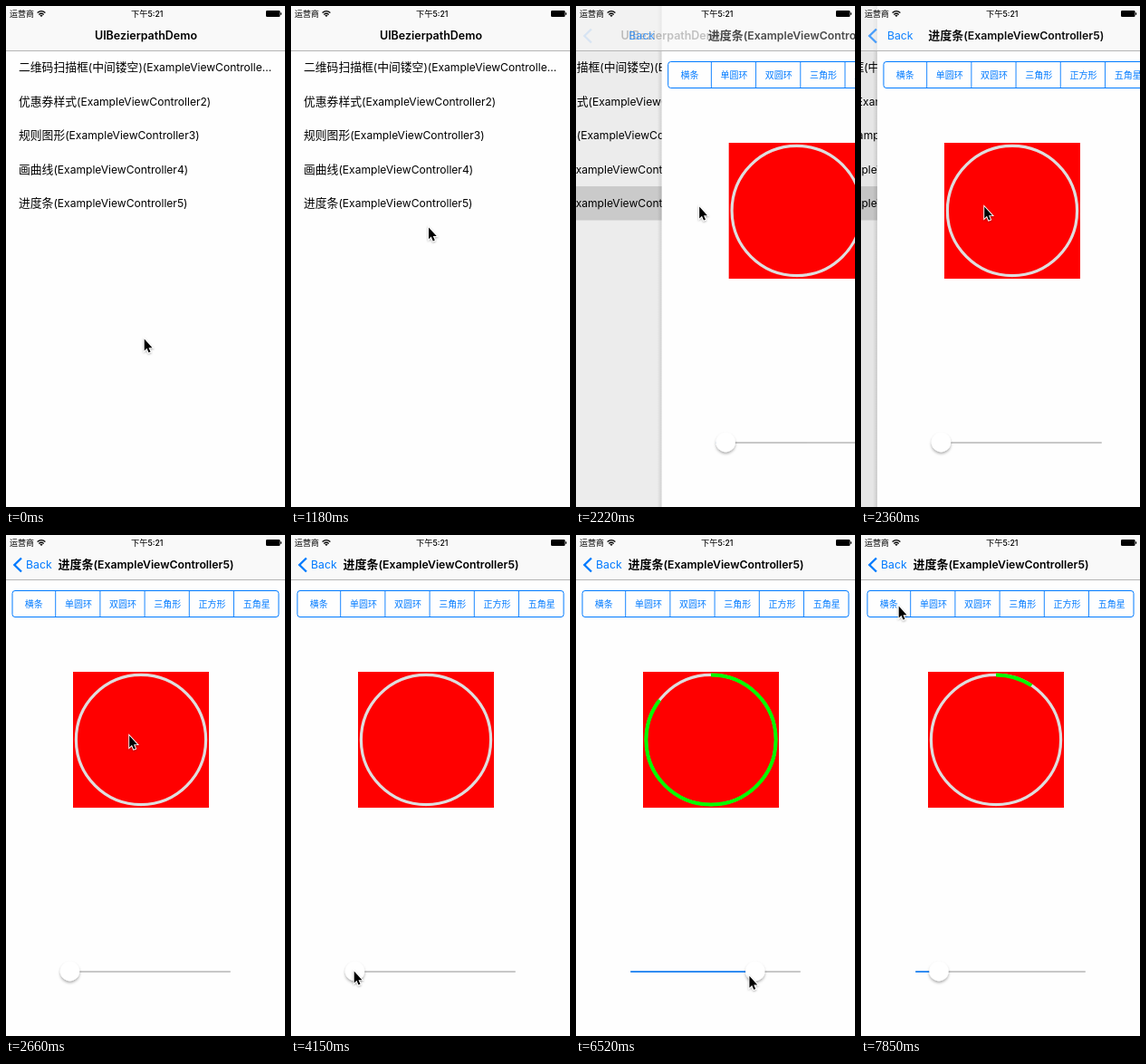
Recreate the animation shown at these times as an HTML page. Size 308x553 px, loop 8000 ms.

```html
<!DOCTYPE html>
<html lang="zh">
<head>
<meta charset="utf-8">
<style>
  html, body { margin: 0; width: 100%; height: 100%; overflow: hidden; background: #fefefe; }
  svg { display: block; width: 308px; height: 553px; font-family: Inter, "Noto Sans CJK SC", "Noto Sans CJK", sans-serif; }
  .blue { fill: #007aff; }
  .line { fill: none; stroke: #007aff; }
  .title { font-weight: 600; text-anchor: middle; }
</style>
</head>
<body>
<svg viewBox="0 0 308 553">
  <defs>
    <linearGradient id="edge"><stop stop-opacity="0"/><stop offset="1" stop-opacity=".12"/></linearGradient>
    <filter id="soft" x="-50%" y="-50%" width="200%" height="200%">
      <feDropShadow dx="0" dy="2" stdDeviation="1.4" flood-opacity=".32"/>
    </filter>
    <filter id="faint" x="-50%" y="-50%" width="200%" height="200%">
      <feDropShadow dx="0" dy="1" stdDeviation=".8" flood-opacity=".35"/>
    </filter>
  </defs>
  <rect width="308" height="553" fill="#fefefe"/>

  <g id="list">
    <rect id="selected" y="199" width="400" height="37.5" fill="#d9d9d9"/>
    <g id="rows"></g>
  </g>
  <rect id="dim" width="308" height="553"/>

  <g id="page">
    <rect x="-5" width="5" height="553" fill="url(#edge)"/>
    <rect width="308" height="553" fill="#fefefe"/>
    <rect class="line" x="7" y="61.5" width="294" height="29" rx="3"/>
    <g id="segments"></g>
    <rect x="74" y="151" width="150" height="150" fill="#f00"/>
    <circle cx="149" cy="226" r="71.6" fill="none" stroke="#dedede" stroke-width="3.2"/>
    <circle id="ring" cx="149" cy="226" r="71.6" fill="none" stroke="#0f0" stroke-width="4" pathLength="1" transform="rotate(-90 149 226)"/>
    <rect x="60" y="481.2" width="188" height="1.6" rx=".8" fill="#b7b7b7"/>
    <rect id="fill" class="blue" x="60" y="481.2" height="1.6" rx=".8"/>
    <circle id="thumb" cy="481.5" r="10.7" fill="#fff" filter="url(#soft)"/>
  </g>

  <rect width="308" height="49" fill="#f7f7f7" opacity=".6"/>
  <rect y="49" width="308" height="1" fill="#b5b5b5"/>
  <g id="status">
    <path d="M34.6 7.6Q39 3.6 43.4 7.6M36.3 9.4Q39 7 41.7 9.4" fill="none" stroke="#000" stroke-width="1.3"/>
    <path d="M37.4 10.4Q39 9.2 40.6 10.4L39 12Z"/>
    <rect x="287" y="5" width="15.5" height="7" rx="1.2"/>
    <rect x="303" y="7.2" width="1.2" height="2.6" rx=".5"/>
  </g>
  <g id="oldTitle"></g>
  <g id="newTitle"></g>
  <path id="chevron" class="line" d="M17 25.5L9.3 33L17 40.5" stroke-width="2.3"/>
  <g id="back"></g>

  <path id="cursor" d="M.7 1.6v12.8l2.8-2.6 2 4.8 2-.9-2-4.5h4z" stroke="#fff" stroke-width="1.8" paint-order="stroke" filter="url(#faint)"/>
</svg>
<script>
const $ = id => document.getElementById(id);
const set = (id, attrs) => { for (const k in attrs) $(id).setAttribute(k, attrs[k]); };
const show = on => on ? 'visible' : 'hidden';
const slide = dx => `translate(${dx} 0)`;
const clamp = (v, lo = 0, hi = 1) => Math.min(hi, Math.max(lo, v));

// Latin runs are set slightly smaller than the Chinese characters beside them.
function addText(parent, text, x, y, size, attrs = '') {
  const runs = text.replace(/[\x20-\x7e…]+/g, s => `<tspan font-size="${size * 0.945}">${s}</tspan>`);
  $(parent).insertAdjacentHTML('beforeend', `<text x="${x}" y="${y}" font-size="${size}" ${attrs}>${runs}</text>`);
}

['二维码扫描框(中间镂空)(ExampleViewControlle…', '优惠券样式(ExampleViewController2)', '规则图形(ExampleViewController3)',
  '画曲线(ExampleViewController4)', '进度条(ExampleViewController5)']
  .forEach((row, i) => addText('rows', row, 14, 72.2 + 37.5 * i, 12.8));

['横条', '单圆环', '双圆环', '三角形', '正方形', '五角星'].forEach((name, i) => {
  const x = 5.5 + 49.2 * i;
  addText('segments', name, x + 25.2, 79.6, 10, 'class="blue" text-anchor="middle"');
  if (i) $('segments').insertAdjacentHTML('beforeend', `<path class="line" d="M${x} 61.5v29" stroke-width=".9"/>`);
});

addText('status', '运营商', 4, 12, 9);
addText('status', '下午5:21', 155.7, 12, 9.3, 'text-anchor="middle" font-weight="500"');
addText('oldTitle', 'UIBezierpathDemo', 154.5, 37, 13.2, 'class="title"');
addText('newTitle', '进度条(ExampleViewController5)', 154.5, 37, 13, 'class="title"');
addText('back', 'Back', 22, 37, 13, 'class="blue"');

const LOOP = 8000, START = 450, STEP = 148;
const TAP = 11, PUSH_STEPS = 4, GRAB = 25, RELEASE = 44;
const THUMB_LAG = 0.4, RING_LAG = 1.2;

const smooth = u => u * u * (3 - 2 * u);
const accelerate = u => u * u;

const moves = [
  { from: -1, to: 7, x: 135.5, y: 220, bend: 28 },
  { from: 15, to: 18, x: 18, y: 84 },
  { from: 20, to: 22, x: 80, y: 490 },
  { from: 23, to: GRAB, x: 69, y: 480 },
  { from: 28, to: 36, x: 242, y: 482 },
  { from: 37, to: RELEASE, x: 85, y: 492, ease: accelerate },
  { from: RELEASE, to: 50, x: 41, y: 77 }
];

function cursorAt(n) {
  let x = 152, y = 366;
  for (const { from, to, x: toX, y: toY, bend = 0, ease = smooth } of moves) {
    const u = ease(clamp((n - from) / (to - from)));
    x += (toX - x) * u + bend * Math.sin(Math.PI * u);
    y += (toY - y) * u;
  }
  return { x, y };
}

// The slider follows the cursor while it is held.
const valueAt = n => clamp((cursorAt(clamp(n, GRAB, RELEASE)).x - 69) / 173);

function draw(time) {
  const n = Math.max(-1, Math.floor((time - START + 18) / STEP));
  const { x, y } = cursorAt(n);
  const rest = (1 - clamp((n - TAP) / PUSH_STEPS)) ** 4.1;
  const push = 1 - rest;

  set('cursor', { transform: `translate(${x} ${y})` });
  set('selected', { visibility: show(n >= TAP) });
  set('list', { transform: slide(-93 * push) });
  set('dim', { opacity: 0.1 * push });
  set('page', { transform: slide(308 * rest), visibility: show(push > 0) });
  set('oldTitle', { transform: slide(-70 * push), opacity: clamp(1 - 1.12 * push) });
  set('newTitle', { transform: slide(287 * rest), opacity: push });
  set('back', { transform: slide(118 * rest), opacity: push });
  set('chevron', { opacity: push ** 6 });

  const cx = 70.5 + 167.5 * valueAt(n - THUMB_LAG);
  const arc = valueAt(n - RING_LAG);
  set('thumb', { cx });
  set('fill', { width: cx - 60 });
  set('ring', { 'stroke-dasharray': `${arc} 2`, visibility: show(arc > 0) });
}

const t0 = performance.now();
function frame() {
  draw((performance.now() - t0) % LOOP);
  requestAnimationFrame(frame);
}
frame();
</script>
</body>
</html>
```
